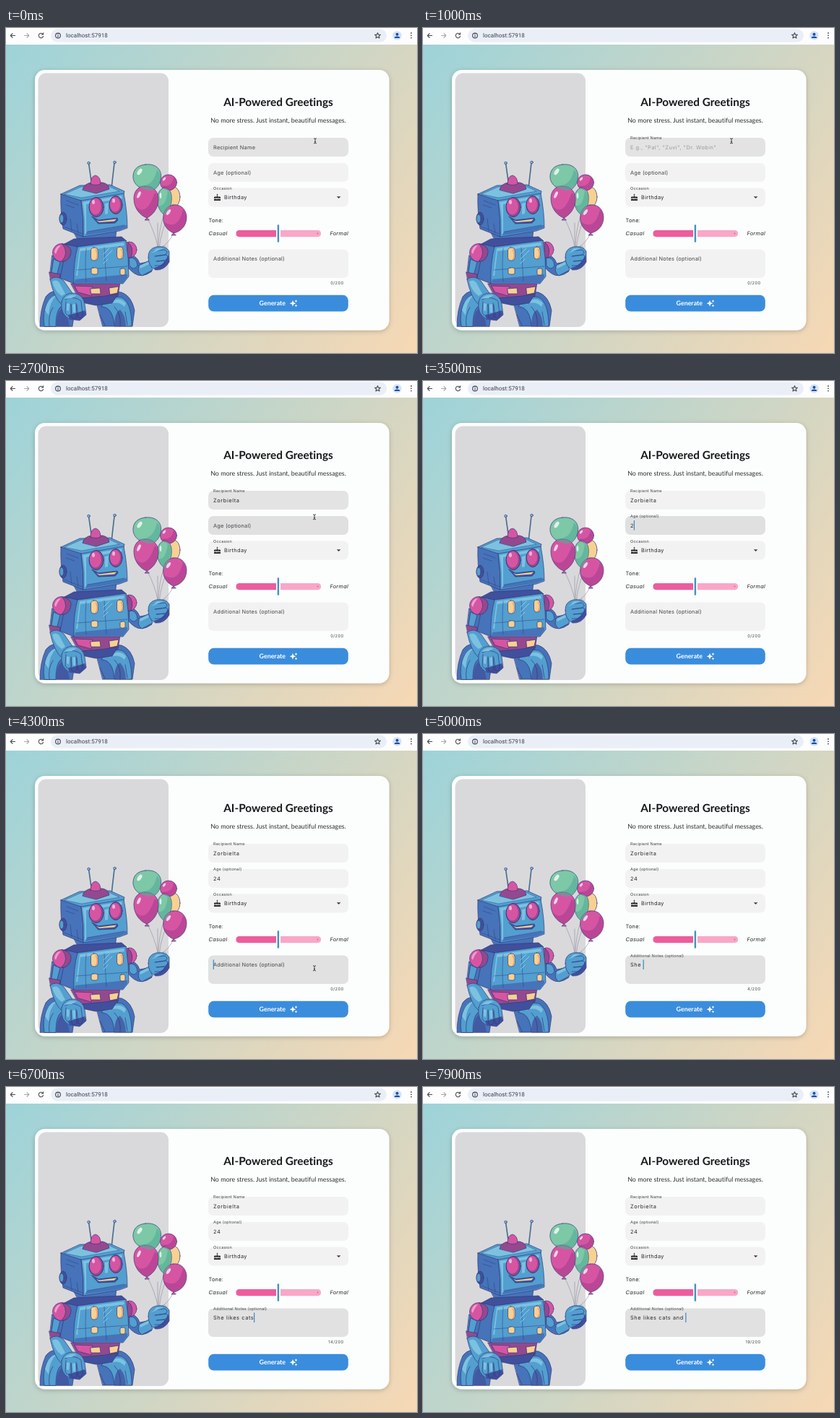
An HTML page for the animation above (8000 ms loop, 569 px wide and 450 px high).

```html
<!DOCTYPE html>
<html lang="en">
<head>
<meta charset="utf-8">
<title>AI-Powered Greetings</title>
<style>
html, body { margin: 0; width: 100%; height: 100%; overflow: hidden; }
svg { display: block; width: 569px; height: 450px; }
text {
  white-space: pre; font: 7.4px Inter, sans-serif; letter-spacing: .23px; fill: #444648;
  text-rendering: geometricPrecision; font-variant-ligatures: none;
}
.lato { font-family: Lato, sans-serif; letter-spacing: 0; fill: #17191b; }
.value { letter-spacing: .6px; fill: #28292b; }
.tone { font-style: italic; fill: #262728; }
.icon { fill: none; stroke: #474a4e; stroke-width: 1.1; stroke-linecap: round; stroke-linejoin: round; }
.box { fill: #f2f2f3; }
.robot { stroke: #34387a; stroke-width: .7; stroke-linejoin: round; stroke-linecap: round; }
.blue { fill: #529fd0; } .deep { fill: #4673b9; } .navy { fill: #40509c; } .sky { fill: #7cc2e0; }
.pink { fill: #d655a3; } .plum { fill: #94498f; } .gold { fill: #f6d192; } .green { fill: #7cc8a7; }
.line { fill: none; } .flat { stroke: none; }
</style>
</head>
<body>
<svg viewBox="0 0 569 450">
<defs>
  <linearGradient id="sky" gradientUnits="userSpaceOnUse" x1="0" y1="23" x2="569" y2="450">
    <stop stop-color="#9dd3d9"/><stop offset="1" stop-color="#f7d8b4"/>
  </linearGradient>
  <filter id="shadow" x="-10%" y="-10%" width="120%" height="120%">
    <feDropShadow dx="0" dy="1.5" stdDeviation="3" flood-opacity=".22"/>
  </filter>
</defs>

<rect width="569" height="450" fill="url(#sky)"/>
<rect width="569" height="23" fill="#fdfdfe"/>
<rect x="62" y="1.5" width="465" height="18" rx="9" fill="#e9eef7"/>
<g class="icon">
  <path d="M12.5 10.5H6.5M9 7.7L6.3 10.5L9 13.3"/>
  <path d="M25.5 10.5H31.5M29 7.7L31.7 10.5L29 13.3" stroke="#a5a8ab"/>
  <path d="M51 8.5A3.2 3.2 0 1 0 51.5 11.5M51.5 6.8V9H49.2"/>
  <circle cx="72" cy="10.5" r="3.4"/><path d="M72 10.2V12.2M72 8.6V8.7"/>
  <path d="M514.5 6.6L515.6 9.2L518.4 9.4L516.3 11.2L517 14L514.5 12.5L512 14L512.7 11.2L510.6 9.4L513.4 9.2Z"/>
</g>
<text x="83" y="13.2" style="font: 8px Roboto, sans-serif; letter-spacing: .05px; fill: #3a3c40">localhost:57918</text>
<circle cx="541.5" cy="10.5" r="6.2" fill="#d3e3fb"/>
<g fill="#1f4fa3"><circle cx="541.5" cy="8.7" r="2"/><path d="M537.8 14V13.2Q538.2 11.4 541.5 11.4T545.2 13.2V14Z"/></g>
<g fill="#47494d"><circle cx="561" cy="7" r=".9"/><circle cx="561" cy="10.3" r=".9"/><circle cx="561" cy="13.6" r=".9"/></g>

<rect x="40" y="58" width="490.5" height="360.5" rx="14" fill="#fcfdfd" filter="url(#shadow)"/>
<rect x="44.5" y="62.5" width="180.5" height="351.5" rx="11" fill="#d9d9db"/>

<g class="robot">
  <!-- balloons -->
  <g class="line" stroke-width=".6" stroke="#8b8c9d">
    <path d="M195 262Q206 282 211 306M219 258Q211 280 211 306M231 248Q215 275 212 306M232 283Q227 298 212 306M213 306Q221 296 223 308M210 270V306"/>
  </g>
  <ellipse class="gold" cx="232" cy="234" rx="9" ry="14"/>
  <ellipse class="pink" cx="225" cy="214" rx="11.5" ry="11"/>
  <path class="green" d="M219 221C234 220 231 251 220 259C207 252 205 225 219 221Z"/>
  <path class="green" d="M193 189C210 187 217 199 214 210C211 222 204 226 197 225C183 223 175 214 176 204C177 194 184 190 193 189Z"/>
  <path class="pink" d="M192 219C205 218 212 228 211 239C210 251 203 259 195 263C184 259 177 248 177 236C177 226 183 219 192 219ZM195 263L192 266H198Z"/>
  <path class="pink" d="M231 245C243 243 250 253 250 262C250 274 242 282 232 284C222 280 216 270 218 259C219 251 225 246 231 245ZM232 284L229 287H235Z"/>
  <g class="flat" fill="#a23d8d" opacity=".55">
    <path d="M211 239C210 251 203 259 195 263Q184 259 179 246Q194 263 206 228Q211 232 211 239Z"/>
    <path d="M250 262C250 274 242 282 232 284Q222 280 218 268Q238 282 245 251Q250 256 250 262Z"/>
    <path d="M236 213Q234 225 225 225Q217 223 215 218Q230 221 232 206Q236 208 236 213Z"/>
  </g>
  <path class="flat" fill="#55ab97" opacity=".6" d="M214 210C211 222 204 226 197 225Q187 223 182 218Q204 222 209 196Q215 202 214 210ZM228 237Q226 253 220 259Q214 255 211 246Q222 248 224 224Q228 229 228 237Z"/>
  <g class="flat" fill="#fff" opacity=".75">
    <ellipse cx="185" cy="199" rx="2.5" ry="5" transform="rotate(35 185 199)"/>
    <ellipse cx="184" cy="231" rx="2" ry="5" transform="rotate(25 184 231)"/>
    <ellipse cx="225" cy="255" rx="2" ry="4.5" transform="rotate(35 225 255)"/>
    <ellipse cx="219" cy="209" rx="1.5" ry="3" transform="rotate(40 219 209)"/>
    <ellipse cx="214" cy="232" rx="1.3" ry="4"/>
  </g>

  <!-- legs and waist -->
  <path class="deep" d="M47 413Q47 390 55 372Q64 360 80 366L98 372L92 413Z"/>
  <path class="blue" d="M53 413Q50 394 57 381Q65 367 77 371L80 384Q69 386 69 413Z"/>
  <path class="sky flat" d="M54 391Q58 372 70 370Q60 379 59 398Z"/>
  <path class="deep" d="M125 379Q140 362 160 366Q174 371 178 391L175 413H134Z"/>
  <path class="blue" d="M132 385Q146 369 160 373Q174 380 174 413H150Q149 394 140 388Z"/>
  <path class="navy flat" d="M70 413Q70 394 77 389L86 404L88 413ZM150 413Q150 394 158 390Q166 399 166 413Z" opacity=".75"/>
  <path class="sky flat" d="M143 380Q157 371 166 381L164 386Q155 377 143 383Z"/>
  <path class="line" d="M60 413Q58 397 65 387M158 413Q160 396 150 386M168 411L165 393M137 412L130 397"/>
  <path class="plum" d="M90 354L158 352L155 371L137 382L103 378Z"/>
  <path class="pink" d="M95 357L120 358L118 371L100 366Z"/>
  <path class="gold" d="M117 361L130 360L131 368H118ZM143 360L156 358L154 367L144 369Z"/>
  <path class="navy" d="M104 374L137 371L155 368L147 381L124 384L105 380Z"/>

  <!-- holding arm -->
  <path class="deep" d="M167 314Q181 313 185 326L196 324L202 337Q188 347 178 340Q170 335 167 327Z"/>
  <path class="blue" d="M171 318Q181 317 182 329Q177 337 171 329Z"/>
  <path class="blue" d="M184 329L198 322L203 335L188 343Q181 338 184 329Z"/>
  <path class="sky flat" d="M185 329L197 324L198 327L186 333Z"/>
  <ellipse class="pink" cx="171" cy="307" rx="10" ry="11"/>
  <path class="plum" d="M169 297Q178 304 173 318L168 318Z"/>
  <path class="blue" d="M197 318Q196 306 208 303Q221 301 226 309L226 324Q219 336 207 335Q197 330 197 318Z"/>
  <path class="navy flat" d="M205 332Q219 329 225 314L226 324Q219 336 207 335Z"/>
  <path class="line" d="M204 309L220 307Q226 311 220 314L206 316M207 316L222 314Q227 319 219 322L208 323M209 323L219 322Q222 326 215 329L206 329"/>
  <path class="sky flat" d="M201 312L209 305L218 305L206 310Z"/>

  <!-- torso -->
  <path class="deep" d="M93 281L153 278L151 298L104 302Z"/>
  <path class="navy" d="M79 300L94 292L160 289L167 295L98 303Z"/>
  <path class="deep" d="M81 299L99 303L94 354L74 346Z"/>
  <path class="blue" d="M99 303L166 294Q170 318 170 344L162 354H94Q93 325 99 303Z"/>
  <path class="sky flat" d="M102 305L163 297L164 301L103 309L99 343H97Z"/>
  <path class="deep flat" d="M96 348L168 341V345L162 353H95Z"/>
  <path class="line" stroke-width=".5" d="M111 305Q109 330 111 351M136 304L139 350M98 335L168 330"/>
  <rect class="gold" x="117.5" y="304" width="9.5" height="18" rx="4"/>
  <rect class="gold" x="153.5" y="303" width="8.5" height="17" rx="4"/>
  <path class="flat" fill="#eda678" d="M123 306Q128 315 123 321Q126 321 127 318V308ZM158 305Q163 313 158 319Q162 319 162 316V307Z"/>
  <rect class="gold" x="118" y="332" width="9" height="9" rx="2.5"/>
  <rect class="gold" x="158" y="333" width="7" height="9" rx="2"/>
  <path class="line" stroke="#b9def0" d="M135 313L143 305M135 320L147 308M135 326L141 320"/>

  <!-- hanging arm -->
  <path class="deep" d="M64 315L80 321L75 346L61 341Z"/>
  <path class="blue" d="M66 320L75 324L70 343L63 340Z"/>
  <circle class="pink" cx="77" cy="311" r="12.5"/>
  <path class="plum" d="M78 299Q94 302 89 315Q85 324 77 323Q88 312 78 299Z"/>
  <path class="flat" fill="#efa0cd" d="M67 310Q69 301 76 301Q71 306 69 313Z"/>
  <path class="plum" d="M60 338L75 341L74 350L62 349Z"/>
  <path class="blue" d="M61 348Q70 341 80 350L94 370L77 383Q66 373 61 348Z"/>
  <path class="sky flat" d="M64 351Q70 347 74 353L82 368L77 371Q67 364 64 351Z"/>
  <path class="blue" d="M77 379Q80 366 95 367Q107 370 109 382L111 397L102 405L88 403Q75 397 77 379Z"/>
  <path class="navy flat" d="M86 398L109 391L111 397L102 405L88 403Z"/>
  <path class="line" d="M83 379L82 394Q86 402 90 395L90 382M90 383L91 401Q97 406 98 398L97 381M98 383L100 401Q106 404 106 395L104 379M82 376Q94 370 104 378"/>
  <path class="sky flat" d="M81 375Q87 368 98 370L91 374ZM84 381L88 382L87 392L84 391ZM92 383L96 382V394L93 394Z"/>

  <!-- head -->
  <g class="line" stroke="#4a6f91" stroke-width="1.7"><path d="M114.5 187L119 219M150 187L146 222"/></g>
  <circle class="sky" cx="114.5" cy="187" r="1.8"/><circle class="sky" cx="150.5" cy="186" r="1.8"/>
  <path class="blue" d="M76 230L102 218L144 217L164 226L162 234L104 242Z"/>
  <path class="sky" stroke-width=".4" d="M81 230L104 220L142 219L157 226L105 235Z"/>
  <path class="plum" d="M106 224Q108 215 119 214H134Q142 216 143 223L125 229Z"/>
  <path class="pink" d="M117 216Q117 205 124 204Q131 206 131 216Q124 219 117 216Z"/>
  <path class="deep" d="M76 230L104 239Q108 264 107 289L79 278Q75 252 76 230Z"/>
  <path class="blue" d="M104 239L163 229Q168 255 168 277L157 281L107 289Q108 264 104 239Z"/>
  <path class="sky flat" d="M106 241L160 232L161 236L111 244L111 284L109 286Q110 260 106 241ZM137 243L142 242L141 257L137 258Z"/>
  <path class="deep flat" d="M112 282L167 273V276L157 280L110 287Z"/>
  <ellipse class="navy" cx="79" cy="264" rx="5" ry="9"/><ellipse class="blue" cx="77" cy="264" rx="3" ry="6"/>
  <path class="line" stroke-width=".5" d="M84 239L100 245M83 245L95 249M91 281L89 264M100 284L98 271M80 275L106 285M113 282L164 273"/>
  <g stroke-width="1">
    <ellipse class="plum" cx="125" cy="248" rx="10" ry="13.5"/><ellipse class="plum" cx="152" cy="245" rx="9" ry="12.5"/>
  </g>
  <g class="flat pink"><ellipse cx="123.8" cy="247.2" rx="8" ry="11.2"/><ellipse cx="151" cy="244.3" rx="7.2" ry="10.2"/></g>
  <g class="flat" fill="#f3b3d6"><ellipse cx="121" cy="241" rx="2" ry="3"/><ellipse cx="149" cy="239" rx="2" ry="3"/></g>
  <path class="navy" d="M119 261L128 266L154 263L155 266L151 270L128 271Z"/>
  <path class="gold flat" d="M125 266L129 267.5L153 264.5L150 267.5L129 269Z"/>
</g>

<text class="lato" x="377" y="108.4" text-anchor="middle" style="font-size:15.4px;font-weight:700">AI-Powered Greetings</text>
<text class="lato" x="377" y="131" text-anchor="middle" style="font-size:8.9px;fill:#2b2d2f">No more stress. Just instant, beautiful messages.</text>

<g id="fields"></g>

<rect class="box" x="280" y="221.5" width="194" height="26" rx="7"/>
<text transform="translate(287 223.8) scale(.75)">Occasion</text>
<path fill="#27292b" d="M288 239V236.5Q289.5 237.5 290.5 236.3Q292 238 293.5 236.3Q295 237.5 297 236.5V239ZM288 235.6V234.5Q288 233.4 289.2 233.4H291.9V232.2H293V233.4H295.8Q297 233.4 297 234.5V235.6Q295.3 236.5 293.8 235Q292.3 236.7 290.7 235Q289.5 236.5 288 235.6ZM292.5 229.5Q294.3 231.7 292.5 231.8Q290.7 231.7 292.5 229.5Z"/>
<text x="302" y="237" style="letter-spacing:.35px;fill:#28292b">Birthday</text>
<path d="M457.8 233.2H463.4L460.6 236.1Z" fill="#3a3c3e"/>

<text x="280.5" y="268.8" style="fill:#262728">Tone:</text>
<text class="tone" x="280.5" y="287.4">Casual</text>
<text class="tone" x="474" y="287.4" text-anchor="end">Formal</text>
<path d="M323 280H374V289.2H323Q318.5 289.2 318.5 284.6T323 280Z" fill="#ec5c9d"/>
<path d="M380 280H431.5Q436 280 436 284.6T431.5 289.2H380Z" fill="#f9a7c7"/>
<circle cx="431.5" cy="284.6" r="1" fill="#ec5c9d"/>
<rect x="375.7" y="272.3" width="2.4" height="24.5" rx="1.2" fill="#4393bd"/>

<text id="counter" x="467.5" y="354.5" text-anchor="end" style="font-size:5.8px;letter-spacing:.35px"></text>
<rect x="280.2" y="369.8" width="193.6" height="22.7" rx="7.5" fill="#3a8ddd"/>
<text class="lato" x="350.5" y="384.2" style="font-size:8.9px;font-weight:700;fill:#fff">Generate</text>
<path fill="#fff" d="M397 377L398.3 380L401.3 381.3L398.3 382.6L397 385.6L395.7 382.6L392.7 381.3L395.7 380ZM401.5 376L402.1 377.5L403.6 378.1L402.1 378.7L401.5 380.2L400.9 378.7L399.4 378.1L400.9 377.5ZM401.5 382.4L402.1 383.9L403.6 384.5L402.1 385.1L401.5 386.6L400.9 385.1L399.4 384.5L400.9 383.9Z"/>

<path id="pointer" fill="none" stroke="#333" stroke-width=".9" d="M-2 -3.5Q0 -3.5 0 -2.3Q0 -3.5 2 -3.5M0 -2.3V2.5M-2 3.5Q0 3.5 0 2.3Q0 3.5 2 3.5M-1 1H1"/>
</svg>

<script>
const LOOP = 8000;
const steps = (start, gap, count) => Array.from({ length: count }, (_, i) => start + i * gap);
const clamp = v => Math.min(1, Math.max(0, v));
const ease = v => { const p = clamp(v); return p * p * (3 - 2 * p); };
const mix = (a, b, p) => a + (b - a) * p;
const between = (t, a, b) => t >= a && t < b;

const fields = [
  { label: 'Recipient Name', y: 152, h: 26, text: 'Zorbielta', hint: 'E.g., "Pal", "Zuvi", "Dr. Wobin"',
    focus: 400, blur: 2900, hover: [0, 2700], shade: 227, keys: steps(1100, 100, 9) },
  { label: 'Age (optional)', y: 187, h: 26, text: '24', hint: '',
    focus: 2900, blur: 4300, hover: [2700, 4000], shade: 224, keys: [3300, 3600] },
  { label: 'Additional Notes (optional)', y: 306.5, h: 39.5, text: 'She likes cats and ', hint: '',
    focus: 4300, blur: LOOP, hover: [4100, LOOP], shade: 225,
    keys: [...steps(4500, 140, 4), ...steps(5200, 150, 10), ...steps(6900, 200, 5)] }
];

const host = document.getElementById('fields');
const counter = document.getElementById('counter');
const pointer = document.getElementById('pointer');

function add(tag, attrs, content = '') {
  const el = document.createElementNS('http://www.w3.org/2000/svg', tag);
  for (const key in attrs) el.setAttribute(key, attrs[key]);
  el.textContent = content;
  host.append(el);
  return el;
}

for (const f of fields) {
  const line = f.y + 15.6;
  f.box = add('rect', { x: 280, y: f.y, width: 194, height: f.h, rx: 7 });
  f.tag = add('text', {}, f.label);
  f.ghost = add('text', { x: 287, y: line, style: 'letter-spacing:.45px;fill:#9a9b9d' }, f.hint);
  f.value = add('text', { x: 287, y: line, class: 'value' });
  f.caret = add('rect', { y: f.y + 6, width: 1.2, height: 13.5, fill: '#338bc4' });
}

function drawField(f, t) {
  const focused = between(t, f.focus, f.blur);
  const typed = f.keys.filter(k => k <= t);
  const lift = ease((t - f.focus) / 167);
  const grey = focused || between(t, ...f.hover) ? f.shade : 242;
  f.box.setAttribute('fill', `rgb(${grey},${grey},${grey + 1})`);
  f.tag.setAttribute('transform', `translate(287 ${f.y + mix(15.8, 2.2, lift)}) scale(${mix(1, .75, lift)})`);
  f.ghost.setAttribute('opacity', typed.length ? 0 : lift);
  f.value.textContent = f.text.slice(0, typed.length);
  const since = t - (typed.length ? typed[typed.length - 1] : f.focus);
  f.caret.setAttribute('visibility', focused && since % 1000 < 500 ? 'visible' : 'hidden');
  f.caret.setAttribute('x', 286.7 + (typed.length ? f.value.getComputedTextLength() : 0));
  return typed.length;
}

function drawPointer(t) {
  const shown = t < 1100 || between(t, 2400, 3300) || between(t, 3800, 4500);
  const x = 428 - ease(t / 800);
  const y = 156.3 + 43 * ease((t - 2400) / 450) + 125 * ease((t - 3800) / 450);
  pointer.setAttribute('transform', `translate(${x} ${y})`);
  pointer.setAttribute('visibility', shown ? 'visible' : 'hidden');
}

function draw(now) {
  const t = now % LOOP;
  const [, , notes] = fields.map(f => drawField(f, t));
  counter.textContent = `${notes}/200`;
  drawPointer(t);
}

const start = performance.now();
function tick() {
  draw(performance.now() - start);
  requestAnimationFrame(tick);
}
tick();
</script>
</body>
</html>
```
